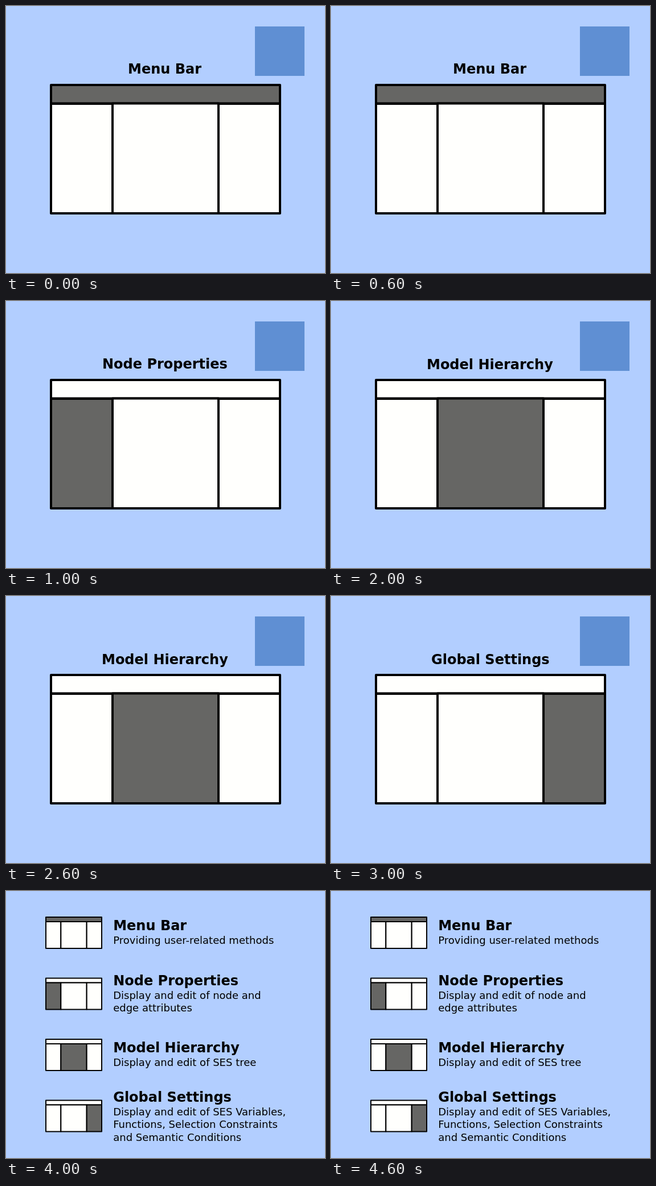
Animation, 560 px wide and 470 px high, one loop 5 s. Source, as an HTML page:

```html
<!DOCTYPE html>
<html lang="en">
<head>
<meta charset="utf-8">
<title>Editor layout</title>
<style>
  html, body { margin: 0; width: 100%; height: 100%; overflow: hidden; background: #b2ceff; }
  svg { display: block; font: 18px "DejaVu Sans", sans-serif; }
  .title { font-weight: bold; font-size: 24px; }
  rect.pane { stroke: #000; stroke-linejoin: round; }
</style>
</head>
<body>
<svg id="stage" width="560" height="470" viewBox="0 0 560 470"></svg>
<script>
const STEP = 1000;
const stage = document.getElementById('stage');

// Pane rectangles relative to the window's top left corner: x, y, width, height
const panes = [[0, 0, 402, 32.5], [0, 33, 108, 193], [108, 32.5, 186, 193.5], [294, 33, 108, 193]];

const parts = [
  { title: 'Menu Bar', x: 214, y: 119, listY: 69,
    lines: ['Providing user-related methods'] },
  { title: 'Node Properties', x: 169, y: 119.2, listY: 165.7,
    lines: ['Display and edit of node and', 'edge attributes'] },
  { title: 'Model Hierarchy', x: 168, y: 120, listY: 284,
    lines: ['Display and edit of SES tree'] },
  { title: 'Global Settings', x: 176, y: 120, listY: 370.5,
    lines: ['Display and edit of SES Variables,', 'Functions, Selection Constraints', 'and Semantic Conditions'] }
];

const text = (x, y, str, cls = '') => `<text x="${x}" y="${y}" class="${cls}">${str}</text>`;

function layout(x, y, scale, stroke, active) {
  return panes.map((pane, i) => {
    const [px, py, w, h] = pane.map(v => v * scale);
    return `<rect class="pane" x="${x + px}" y="${y + py}" width="${w}" height="${h}"
      fill="${i === active ? '#666664' : '#fffffd'}" stroke-width="${stroke}"/>`;
  }).join('');
}

function single(i) {
  const { title, x, y } = parts[i];
  return '<rect x="437" y="36" width="87" height="87" fill="#5f8fd3"/>' +
    text(x, y, title, 'title') + layout(79, 139, 1, 4, i);
}

function summary() {
  return parts.map(({ title, listY, lines }, i) =>
    layout(70, 46 + 107.5 * i, 98 / 402, 2, i) +
    text(188.2, listY, title, 'title') +
    lines.map((line, n) => text(188.2, listY + 24.2 + 22.5 * n, line)).join('')
  ).join('');
}

const scenes = [...parts.map((_, i) => single(i)), summary()];
const start = performance.now();
let shown = -1;

function draw() {
  const index = Math.floor((performance.now() - start) / STEP) % scenes.length;
  if (index !== shown) stage.innerHTML = scenes[shown = index];
  requestAnimationFrame(draw);
}
draw();
</script>
</body>
</html>
```
